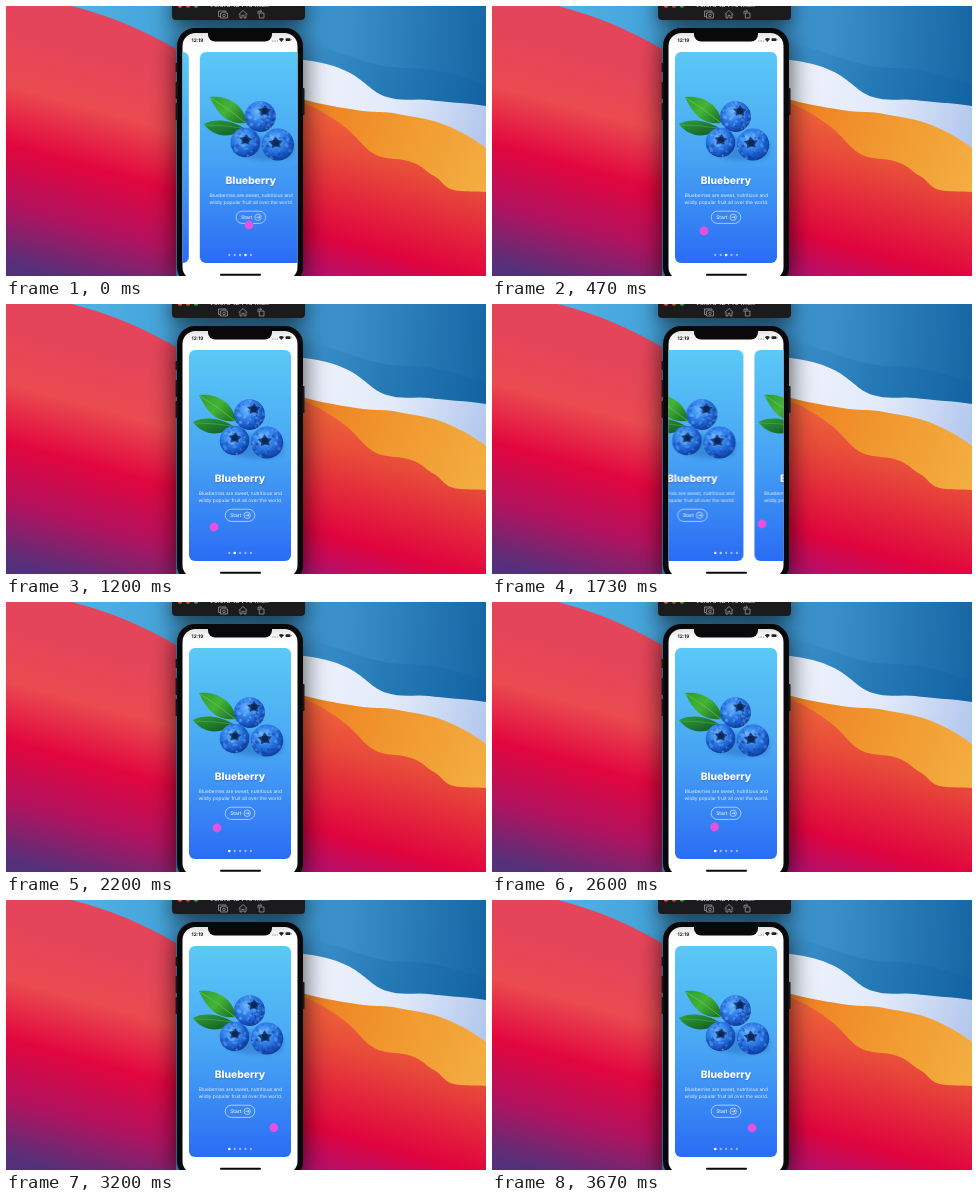
These frames come from a looping animation (480 by 270 pixels, 3.74 s). An HTML page with a canvas:

```html
<!DOCTYPE html>
<html lang="en">
<head>
<meta charset="utf-8">
<title>Fruit onboarding</title>
<style>
  html, body { margin: 0; width: 100%; height: 100%; overflow: hidden; background: #000; }
  canvas { display: block; width: 480px; height: 270px; }
</style>
</head>
<body>
<canvas id="stage"></canvas>
<script>
const LOOP = 3740, STEP = 200 / 3, PITCH = 113, TAU = Math.PI * 2;
const ratio = window.devicePixelRatio || 1;
const stage = document.getElementById('stage');
stage.width = 480 * ratio;
stage.height = 270 * ratio;
let ctx = stage.getContext('2d');

// Each swipe moves one page back; pointer stops are [ms, x, y].
const swipes = [-86, 640, 1446];
const pointerStops = [
  [0, 243, 219], [140, 280, 219], [470, 212, 225], [620, 212, 224],
  [900, 280, 220], [1200, 208, 223], [1430, 208, 224], [1730, 270, 220],
  [1830, 280, 221], [2200, 211, 226], [2540, 212, 225], [2800, 290, 225],
  [2950, 291, 226], [3300, 262, 228], [3670, 260, 228]
];

const smooth = u => { u = Math.min(1, Math.max(0, u)); return u * u * (3 - 2 * u); };
const pageAt = t => swipes.reduce((page, start) => page - smooth((t - start) / 450), 3);

function pointerAt(t) {
  const i = Math.max(1, pointerStops.findIndex(s => s[0] >= t));
  const [t0, x0, y0] = pointerStops[i - 1], [t1, x1, y1] = pointerStops[i];
  const u = smooth((t - t0) / (t1 - t0));
  return [x0 + (x1 - x0) * u, y0 + (y1 - y0) * u];
}

function gradient(g, colours) {
  colours.forEach((c, i) => g.addColorStop(i / (colours.length - 1), c));
  return g;
}
const linear = (x0, y0, x1, y1, ...c) => gradient(ctx.createLinearGradient(x0, y0, x1, y1), c);
const radial = (x, y, r, ...c) => gradient(ctx.createRadialGradient(x, y, 0, x, y, r), c);

function shape(path, fill) {
  ctx.fillStyle = fill;
  ctx.fill(new Path2D(path));
}
function line(path, colour, width) {
  ctx.strokeStyle = colour;
  ctx.lineWidth = width;
  ctx.stroke(new Path2D(path));
}
function box(x, y, w, h, r, fill) {
  ctx.beginPath();
  ctx.roundRect(x, y, w, h, r);
  ctx.fillStyle = fill;
  ctx.fill();
}
function disc(x, y, r, fill) {
  ctx.beginPath();
  ctx.arc(x, y, r, 0, TAU);
  ctx.fillStyle = fill;
  ctx.fill();
}
function label(text, x, y, size, weight = 400, colour = '#fff', align = 'center') {
  ctx.font = `${weight} ${size}px Inter, sans-serif`;
  ctx.textAlign = align;
  ctx.textRendering = 'geometricPrecision';
  ctx.fillStyle = colour;
  ctx.fillText(text, x, y);
}
function shadowed(colour, blur, offset, paint) {
  ctx.save();
  ctx.shadowColor = colour;
  ctx.shadowBlur = blur * ratio;
  ctx.shadowOffsetY = offset * ratio;
  paint();
  ctx.restore();
}

function wallpaper() {
  box(0, 0, 480, 270, 0, linear(60, 0, 480, 30, '#52b4e6', '#3f9bd3', '#3a8fc9', '#1767a5'));
  shape('M295 36C340 46 365 62 400 62S450 70 480 78V120H295Z', linear(295, 50, 480, 90, '#3d92cd', '#2479b5', '#1363a2'));
  shape('M295 53.5C315 56 328 59 340 65C358 73 366 87 381 91C396 96 410 92 423 94S462 97 480 100V160H295Z',
    linear(300, 70, 480, 125, '#eef2fc', '#e2eafa', '#b3c8ee'));
  shape('M295 93C315 98 330 101 350 104S378 105 392 108S420 112 434 117S466 131 480 142V220H295Z',
    linear(295, 100, 480, 165, '#ee7d22', '#f1982f', '#f3ad40'));
  shape('M295 96C312 102 327 112 340 122C354 133 360 147 376 151C388 154 397 152 408 157C418 161 420 166 428 170S438 183 450 184.500S468 185 480 186V270H295Z',
    linear(390, 120, 345, 280, '#ee643a', '#e84a3a', '#e4263c', '#e0043e', '#b3106f'));
  shape('M0 0H66C105 10 135 23 170 43V270H0Z',
    linear(110, 50, 50, 270, '#e5455a', '#ea4a50', '#e2063f', '#b3125f', '#55307a'));
}

function titleBar() {
  shadowed('#000a', 20, 4, () => box(166, -10, 133, 24, 4, '#1b1a1c'));
  ['#f4504c', '#a8632a', '#38a848'].forEach((c, i) => disc(174 + i * 8, -.8, 2.5, c));
  label('Velora 12 Pro Max', 233, 1, 7, 600, '#b9b4b8');
  const ink = '#a9a7aa';
  line('M214 10.5H212.5V5H220V6M214.5 7H216L216.7 6H218.7L219.4 7H221.5V12H214.5Z', ink, .7);
  ctx.beginPath();
  ctx.arc(218, 9.4, 1.3, 0, TAU);
  ctx.stroke();
  line('M232.7 8.5L237 4.5 241.3 8.5M234 7.8V12H236V9.3H238V12H240V7.8', ink, .7);
  line('M253.3 7H258V12H253.3ZM252 8.2V5.2H255.5M254.2 3.8L255.6 5.2 254.2 6.6', ink, .7);
}

function phone() {
  shadowed('#000b', 26, 4, () => box(171, 22, 126, 257, 18, '#09090b'));
  [[169.6, 57, 9], [169.6, 76, 17], [169.6, 97, 17], [296.5, 82, 27]]
    .forEach(([x, y, h]) => box(x, y, 2, h, .8, '#18181b'));
  box(176.5, 27, 115, 247, 13, '#fff');
}

function statusBar() {
  box(202, 22, 64, 13.5, [0, 0, 7, 7], '#09090b');
  label('12:19', 191.5, 35.8, 4.8, 700, '#17171a');
  for (let i = 0; i < 4; i++) disc(266.5 + i * 1.6, 35, .45, '#444');
  shape('M272.8 33Q275.4 30.8 278 33L275.4 36Z', '#222');
  box(279.5, 32.2, 5, 2.8, .8, '#222');
  box(285, 33, .6, 1.2, .2, '#777');
}

function berry(x, y, r, cx, cy, seed) {
  const random = () => (seed = seed * 16807 % 2147483647) / 2147483647;
  ctx.save();
  ctx.beginPath();
  ctx.arc(x, y, r, 0, TAU);
  ctx.clip();
  ctx.fillStyle = radial(x - 3, y - 5, r * 1.45, '#6fb8fb', '#388af0', '#1c5fd0', '#0b3185');
  ctx.fill();
  for (let i = 0; i < 60; i++) {
    const a = random() * TAU, d = Math.sqrt(random()) * r;
    disc(x + Math.cos(a) * d, y + Math.sin(a) * d, .5 + random() * 1.4,
      random() < .5 ? '#8cc8ff48' : '#0b358c4c');
  }
  ctx.beginPath();
  for (let i = 0; i < 10; i++) {
    const a = i * TAU / 10 + x, d = r * (i % 2 ? .28 : .5);
    ctx.lineTo(cx + Math.cos(a) * d, cy + Math.sin(a) * d * .85);
  }
  ctx.closePath();
  ctx.fillStyle = '#153f88';
  ctx.fill();
  ctx.strokeStyle = '#6bafee99';
  ctx.lineWidth = .7;
  ctx.stroke();
  disc(cx, cy, r * .2, '#0c2856');
  ctx.restore();
}

function fruit() {
  ctx.save();
  ctx.filter = 'blur(2px)';
  shape('M217 145Q240 160 276 151L278 138 230 128Z', '#174da350');
  ctx.restore();
  shape('M193 91C207 89 227 96 230 117C213 119 202 111 193 91Z', linear(195, 93, 222, 118, '#2f9f35', '#44b436', '#1f7a2b'));
  line('M194 92Q211 102 229 117', '#7cc85c', .6);
  shape('M187 118C198 112 214 114 227 122C215 133 197 132 187 118Z', linear(200, 114, 206, 131, '#2a9636', '#17662a'));
  line('M188 119Q208 119 226 122', '#63b04c', .5);
  berry(243.5, 110.5, 15.6, 248, 105, 17);
  berry(228.5, 136.5, 15, 229, 134, 43);
  berry(261, 138.5, 16.3, 259, 137, 91);
}

function card() {
  box(183, 46, 102, 211, 6, linear(0, 46, 0, 257, '#5bc9f6', '#47a4f4', '#2a6cf5'));
  fruit();
  shadowed('#0a307055', 2, 1, () => label('Blueberry', 234, 177.5, 10.3, 800));
  label('Blueberries are sweet, nutritious and', 234.3, 191, 4.8, 400, '#ffffffdd');
  label('wildly popular fruit all over the world.', 234.3, 198, 4.8, 400, '#ffffffdd');
  ctx.beginPath();
  ctx.roundRect(219.2, 205.2, 29.6, 12.2, 6.1);
  ctx.strokeStyle = '#ffffffcc';
  ctx.lineWidth = .7;
  ctx.stroke();
  label('Start', 229.8, 213.1, 5, 400);
  ctx.beginPath();
  ctx.arc(241.2, 211.3, 3.2, 0, TAU);
  ctx.stroke();
  line('M239.5 211.3H243M241.7 209.9L243.1 211.3 241.7 212.7', '#fff', .6);
}

// The still parts are painted once and reused.
function layer(paint) {
  const c = document.createElement('canvas'), main = ctx;
  c.width = stage.width;
  c.height = stage.height;
  ctx = c.getContext('2d');
  ctx.scale(ratio, ratio);
  paint();
  ctx = main;
  return c;
}
const scene = layer(() => { wallpaper(); phone(); titleBar(); });
const cardLayer = layer(card);
const place = (image, x = 0) => ctx.drawImage(image, x, 0, 480, 270);
ctx.scale(ratio, ratio);

function draw(t) {
  const page = pageAt(t);
  place(scene);
  ctx.save();
  ctx.beginPath();
  ctx.roundRect(176.5, 27, 115, 247, 13);
  ctx.clip();
  for (let i = 0; i < 5; i++) {
    if (Math.abs(i - page) < 1.2) place(cardLayer, (i - page) * PITCH);
  }
  for (let i = 0; i < 5; i++) {
    const near = Math.max(0, 1 - Math.abs(i - page));
    disc(223.3 + i * 5.4, 249, 1.15 + near * .2, `rgba(255, 255, 255, ${.5 + near / 2})`);
  }
  ctx.restore();
  statusBar();
  box(214, 267.8, 41, 1.9, 1, '#080808');
  disc(...pointerAt(t), 4.4, '#e452df');
}

function tick(now) {
  const t = now % LOOP;
  draw(Math.floor((t + 4) / STEP) * STEP);
  requestAnimationFrame(tick);
}
requestAnimationFrame(tick);
</script>
</body>
</html>
```
